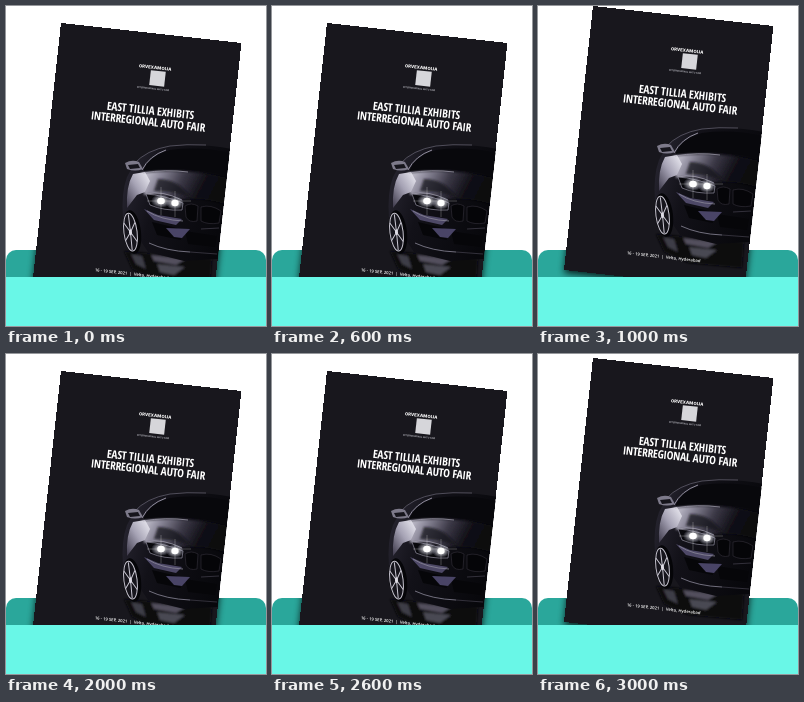
Animation, 260 px wide and 320 px high, one loop 4 s. Source, as an HTML page:

```html
<!DOCTYPE html>
<html lang="en">
<head>
<meta charset="utf-8">
<title>Poster in a pocket</title>
<style>
  html, body { margin: 0; width: 100%; height: 100%; overflow: hidden; background: #fff; }
  svg { display: block; width: 260px; height: 320px; }
  .hop { animation: hop 4s step-end infinite; }
  @keyframes hop {
    0%   { transform: translateY(17px); }
    25%  { transform: translateY(0); }
    50%  { transform: translateY(17px); }
    75%  { transform: translateY(4px); }
    100% { transform: translateY(17px); }
  }
  text { fill: #fff; text-anchor: middle; white-space: pre; }
  .title {
    font: 600 12px "Open Sans Condensed", "Roboto Condensed", "Liberation Sans Narrow", Roboto, sans-serif;
    font-stretch: 75%;
    letter-spacing: -.02em;
  }
  .host { font: 800 4.3px Inter, "Open Sans", sans-serif; }
  .tag { font: 600 2.4px Inter, "Open Sans", sans-serif; fill: #b9b9c0; }
  .date { font: 600 4.2px "Open Sans", Lato, sans-serif; }
</style>
</head>
<body>
<svg viewBox="0 0 260 320">
  <defs>
    <path id="paper" d="M55 0 235.45 20 206.4 284 26 264Z"/>
    <clipPath id="sheet"><use href="#paper"/></clipPath>
    <clipPath id="back"><rect y="244" width="260" height="40" rx="10"/></clipPath>
    <linearGradient id="body" x1="0" x2="1" y1="0" y2=".3">
      <stop stop-color="#2b2935"/><stop offset=".4" stop-color="#121118"/><stop offset="1" stop-color="#08080c"/>
    </linearGradient>
    <linearGradient id="hood" x1="0" x2="1" y1="0" y2=".2">
      <stop stop-color="#d2d0dc"/><stop offset=".22" stop-color="#8d8a9b"/>
      <stop offset=".5" stop-color="#3b3846"/><stop offset=".75" stop-color="#121118"/>
      <stop offset="1" stop-color="#09090d"/>
    </linearGradient>
    <linearGradient id="fender" x1="1" x2="0" y1="0" y2="1">
      <stop stop-color="#f0eff6"/><stop offset=".5" stop-color="#a5a2b4"/><stop offset="1" stop-color="#3a3647"/>
    </linearGradient>
    <radialGradient id="glow">
      <stop stop-color="#fff"/><stop offset=".3" stop-color="#fff" stop-opacity=".75"/>
      <stop offset="1" stop-color="#cfd0ee" stop-opacity="0"/>
    </radialGradient>
    <filter id="soft" x="-30%" y="-30%" width="160%" height="160%"><feGaussianBlur stdDeviation="1"/></filter>
    <filter id="haze" x="-20%" y="-20%" width="140%" height="140%"><feGaussianBlur stdDeviation="3.5"/></filter>
  </defs>

  <g clip-path="url(#back)">
    <rect y="243" width="260" height="40" fill="#2aa79b"/>
    <g class="hop"><use href="#paper" y="3" opacity=".8" filter="url(#haze)"/></g>
  </g>

  <g class="hop">
    <use href="#paper" fill="#18171d" shape-rendering="crispEdges"/>

    <g clip-path="url(#sheet)">
      <!-- floor reflection -->
      <g filter="url(#soft)">
        <path fill="#08080c" d="M118 228 206 236 204 262 150 257 126 246Z"/>
        <path fill="#6b6878" opacity=".75" d="M145 232 180 236 170 242 148 238Z"/>
        <path fill="#8c8998" opacity=".5" d="M151 241 179 244 168 252 154 249Z"/>
        <path fill="#55525f" opacity=".7" d="M125 231 136 233 140 246 130 241Z"/>
      </g>

      <!-- body and glass -->
      <path fill="url(#body)" d="M117 195Q115 170 121 154L128 141Q140 127 164 123 196 120 226 126L212 236 178 238 142 229 132 214 126 230Q117 222 117 195Z"/>
      <path fill="#08080c" d="M138 146Q145 132 164 127 194 123 224 130L222 153Q182 143 138 148Z"/>
      <path fill="none" stroke="#5f5c6a" stroke-width=".8" d="M128 141Q140 127 164 123 180 121 200 122"/>
      <path fill="none" stroke="#a19eae" stroke-width=".9" d="M136 147Q143 133 160 127"/>
      <path fill="#7d7a8a" d="M119 140Q126 136 133 139L137 146Q129 149 121 146Z"/>
      <path fill="#16151c" d="M122 142 132 141 134 145 124 146Z"/>

      <!-- hood and fender -->
      <path fill="url(#hood)" filter="url(#soft)" d="M136 150Q176 144 222 155L218 181Q196 174 176 176 154 169 138 172Z"/>
      <path fill="url(#fender)" d="M127 151 139 149 144 158 139 169 131 172 121 185Q120 163 127 151Z"/>
      <path fill="#15141b" opacity=".75" filter="url(#soft)" d="M152 156Q172 156 184 174L165 169 148 168Z"/>
      <path fill="none" stroke="#aaa7b6" stroke-width=".7" d="M137 150Q160 146 182 149M140 171Q156 167 176 177"/>

      <!-- grille and bumper -->
      <path fill="#050508" stroke="#34323c" stroke-width=".6" d="M179 183Q185 179 192 183L191 198Q183 200 180 194ZM195 184Q205 181 215 188L213 200Q202 202 195 198Z"/>
      <path fill="#5d577b" opacity=".8" d="M138 186 152 192 176 196 170 202 148 197Z"/>
      <path fill="#060609" d="M146 199 171 205 175 217 151 212ZM179 208 211 213 209 224 182 221Z"/>
      <path fill="#494466" d="M160 205 184 206 176 215 168 214Z"/>
      <path fill="none" stroke="#8b8898" stroke-width=".8" d="M141 188Q155 197 177 198M143 220Q160 228 184 229"/>
      <path fill="none" stroke="#45424f" stroke-width=".7" d="M184 229 211 231M195 206 213 205"/>

      <!-- front wheel -->
      <g transform="rotate(-7 126 209)">
        <ellipse cx="126" cy="209" rx="9" ry="22" fill="#050508"/>
        <ellipse cx="124.5" cy="209" rx="6.6" ry="19" fill="#16151c" stroke="#c3c1cc" stroke-width="1"/>
        <path fill="none" stroke="#c9c7d2" stroke-width="1" d="M124.5 209V191M124.5 209 130 200M124.5 209 130 219M124.5 209 124 227M124.5 209 118.5 217M124.5 209 119 199"/>
        <ellipse cx="124.5" cy="209" rx="1.5" ry="3" fill="#dddbe4"/>
      </g>

      <!-- headlights -->
      <path fill="#08080c" stroke="#8f8c9b" stroke-width=".7" d="M140 171Q157 172 177 180L176 187Q158 188 144 182Z"/>
      <ellipse cx="155" cy="178" rx="10" ry="7" fill="url(#glow)"/>
      <ellipse cx="169" cy="180" rx="9" ry="7" fill="url(#glow)"/>
      <ellipse cx="155" cy="178" rx="3.8" ry="3.2" fill="#fff"/>
      <ellipse cx="169" cy="180" rx="3.6" ry="3.2" fill="#fff"/>
      <path stroke="#fff" stroke-width=".5" opacity=".5" d="M155 164V192M141 178H185M169 168V194"/>
    </g>

    <text class="host" transform="translate(149 46) rotate(6.35)">ORVEXAMOLIA</text>
    <rect x="-8" y="-7.5" width="15" height="15" fill="#d6d6da" transform="translate(152 55.5) rotate(6.35)"/>
    <text class="tag" transform="translate(147 66.5) rotate(6.35)">INTERREGIONAL AUTO FAIR</text>
    <text class="title" transform="translate(144 91.5) rotate(6.35)">EAST TILLIA EXHIBITS</text>
    <text class="title" transform="translate(141.5 102.5) rotate(6.35)">INTERREGIONAL AUTO FAIR</text>
    <text class="date" transform="translate(125.5 252.3) rotate(6.35)">16 - 19 SEP, 2021  |  Velto, Hyderabad</text>
  </g>

  <path fill="#69f7e7" d="M0 271H260V320H0Z"/>
</svg>
<script>
  // One type size for both title lines, chosen so the longer one stays in its column.
  const lines = [...document.querySelectorAll(".title")];
  const widest = Math.max(...lines.map(line => line.getComputedTextLength()));
  const size = Math.min(12.5, 12 * 115 / widest);
  lines.forEach(line => { line.style.fontSize = size + "px"; });
</script>
</body>
</html>
```
